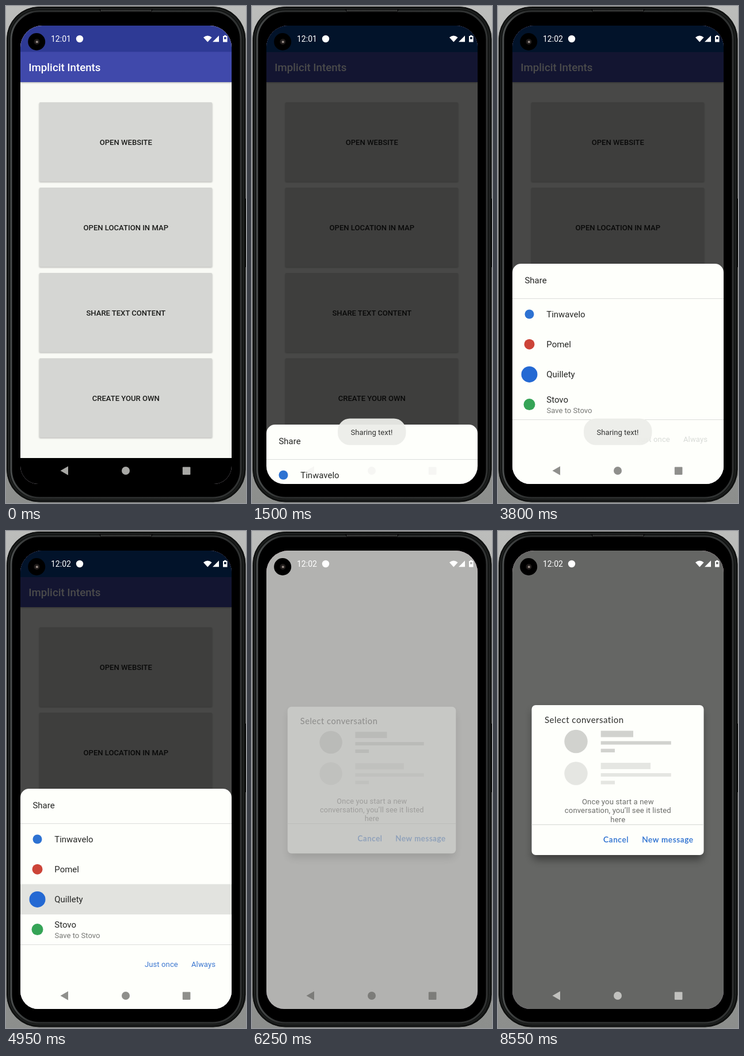
Animation of 417 by 862 pixels, one loop 8.65 s. Source, as an HTML page:

```html
<!DOCTYPE html>
<html lang="en">
<head>
<meta charset="utf-8">
<title>Share sheet demo</title>
<style>
html, body { margin: 0; width: 100%; height: 100%; overflow: hidden; background: #a5a6a4; }
svg { display: block; width: 100%; height: 100%; }
text { font-family: Roboto, "Noto Sans", sans-serif; font-size: 13.07px; }
.mid { text-anchor: middle; }
.med { font-weight: 500; }
.big { font-size: 14.94px; fill: #252624; }
.geo { font-family: Lato, "Open Sans", sans-serif; }
.act { font-size: 13.5px; letter-spacing: .7px; fill: #2a6fd0; stroke: #2a6fd0; stroke-width: .3px; }
.body { fill: #6b6c69; letter-spacing: .14px; }
</style>
</head>
<body>
<svg viewBox="0 0 417 862">
  <defs>
    <linearGradient id="room" x1="0" y1="0" x2="0" y2="1">
      <stop offset="0" stop-color="#bcbdbb"/><stop offset="1" stop-color="#8c8e8c"/>
    </linearGradient>
    <linearGradient id="rim" x1="0" y1="0" x2="1" y2="0">
      <stop offset="0" stop-color="#4a4d4d"/><stop offset=".1" stop-color="#2c2e2e"/>
      <stop offset="1" stop-color="#303232"/>
    </linearGradient>
    <linearGradient id="wall" gradientUnits="userSpaceOnUse" x1="0" y1="34" x2="0" y2="829">
      <stop offset="0" stop-color="#bd84a0"/><stop offset=".55" stop-color="#b5728f"/>
      <stop offset=".71" stop-color="#8f4069"/><stop offset=".818" stop-color="#70405f"/>
      <stop offset=".819" stop-color="#1c0032"/><stop offset="1" stop-color="#18002b"/>
    </linearGradient>
    <clipPath id="screen">
      <path d="M25 72A38 38 0 0 1 63 34H354A38 38 0 0 1 392 72V798A31 31 0 0 1 361 829H56A31 31 0 0 1 25 798Z"/>
    </clipPath>
    <clipPath id="window"><rect x="25" y="34" width="367" height="795"/></clipPath>
    <clipPath id="btnClip"><rect x="58" y="463" width="300" height="137.5" rx="2"/></clipPath>
    <clipPath id="rowClip"><rect x="25" y="612.5" width="367" height="52.5"/></clipPath>
    <filter id="soft" x="-20%" y="-20%" width="140%" height="140%"><feGaussianBlur stdDeviation="7"/></filter>
    <filter id="fine" x="-5%" y="-5%" width="110%" height="112%"><feGaussianBlur stdDeviation="1"/></filter>
  </defs>

  <!-- phone body -->
  <rect width="417" height="862" fill="url(#room)"/>
  <rect x="414" y="334" width="3" height="119" fill="#111"/>
  <rect x="1.5" y="1.5" width="414.5" height="858.5" rx="56" fill="#121413" stroke="#060606"/>
  <rect x="4.5" y="4.5" width="408" height="852" rx="53" fill="none" stroke="#2a2c2c"/>
  <rect x="9" y="9" width="399" height="844" rx="49" fill="#000" stroke="url(#rim)" stroke-width="3"/>
  <rect x="13" y="13" width="391" height="836" rx="45" fill="#000"/>
  <path d="M161 5H256L252 11H165Z" fill="#0b0b0b"/>
  <path d="M165 8H252" stroke="#5c5e5d" stroke-width="3" stroke-dasharray="1 1"/>

  <g clip-path="url(#screen)">
    <rect x="25" y="34" width="367" height="795" fill="url(#wall)"/>
    <g id="app" clip-path="url(#window)">
      <rect x="25" y="34" width="367" height="795" fill="#f9faf5"/>
      <rect x="25" y="80" width="367" height="53.5" fill="#000" opacity=".25" filter="url(#fine)"/>
      <rect x="25" y="34" width="367" height="46" fill="#2e3a95"/>
      <rect x="25" y="79.5" width="367" height="52.5" fill="#4049ab"/>
      <text class="med" x="39.3" y="113" style="font-size:18.68px" fill="#fff">Implicit Intents</text>
      <g id="buttons"></g>
      <rect x="25" y="784" width="367" height="45"/>
      <g id="dim">
        <rect x="25" y="34" width="367" height="795" opacity=".71"/>
        <rect x="25" y="34" width="367" height="46" fill="#02132a"/>
      </g>
      <g id="sheet">
        <rect x="25" y="447" width="367" height="500" rx="15" fill="#fefffb"/>
        <text class="big" x="46.5" y="480.5">Share</text>
        <path d="M25 507.5H392" stroke="#dcdedb"/>
        <g clip-path="url(#rowClip)"><circle id="rowRipple" cx="208" cy="639" fill="#e2e3df"/></g>
        <g id="rows"></g>
      </g>
      <g id="footer">
        <rect x="25" y="717" width="367" height="112" fill="#fefffb"/>
        <path d="M25 717.5H392" stroke="#dcdedb"/>
        <rect id="press" x="233" y="731.5" width="73" height="38.5" rx="3" fill="#eaebe8"/>
        <g id="choices" letter-spacing=".1"><text x="240.9" y="756">Just once</text><text x="322" y="756">Always</text></g>
      </g>
    </g>
    <rect id="page" x="25" y="34" width="367" height="795" fill="#fefffb"/>
    <rect id="shade" x="25" y="34" width="367" height="795"/>

    <g id="dialog">
      <rect x="60" y="310" width="296" height="260" rx="8" opacity=".4" filter="url(#soft)"/>
      <rect x="58.5" y="302" width="299" height="260" rx="7" fill="#fefffb"/>
      <text class="geo" x="81" y="333" style="font-size:15px;letter-spacing:.5px" fill="#2c2d2b">Select conversation</text>
      <g id="bones"></g>
      <text class="mid body" x="208.3" y="473.5">Once you start a new</text>
      <text class="mid body" x="208.3" y="489.2">conversation, you’ll see it listed</text>
      <text class="mid body" x="208.3" y="504.8">here</text>
      <path d="M58.5 509.3H357.5" stroke="#d3d6d2"/>
      <text class="geo act" x="183" y="540">Cancel</text>
      <text class="geo act" x="250.3" y="540">New message</text>
    </g>

    <g id="toast">
      <rect x="149" y="715.5" width="118.5" height="46" rx="21" fill="#ecede9" opacity=".94"/>
      <text class="mid" x="208" y="744" fill="#333432">Sharing text!</text>
    </g>

    <g fill="#fff">
      <text id="clock" x="78" y="62" style="font-size:14px">12:01</text>
      <circle cx="128" cy="57" r="6.2"/>
      <path d="M343 54.6Q350.3 48.4 357.6 54.6L350.3 62.6Z"/>
      <path d="M359 62.3L370 51.3V62.3Z"/>
      <path fill-rule="evenodd" d="M379 50.8H382.5V52H384.5V62.4H377V52H379ZM379 54H382.6V57.4H379Z"/>
    </g>
    <g id="nav"><path d="M94.5 806L108 798.3V813.7Z"/><circle cx="208" cy="806" r="7"/><rect x="306.8" y="799.5" width="13.6" height="13.6" rx="1"/></g>
    <circle cx="53.2" cy="62" r="15"/>
    <circle cx="53.5" cy="62" r="5" fill="#211d1c"/>
    <circle cx="53.8" cy="62.3" r="2" fill="#988d86"/>
  </g>
</svg>

<script>
const LOOP = 8650, STEP = 50, WIDTH = 367, CX = 208.5, CY = 431.5;
const $ = id => document.getElementById(id);
const set = (id, attrs) => { for (const k in attrs) $(id).setAttribute(k, attrs[k]); };
const fade = (id, v) => set(id, { opacity: v.toFixed(3) });
const ramp = (t, a, b) => Math.min(1, Math.max(0, (t - a) / (b - a)));
const mix = (a, b, p) => a + (b - a) * p;

// piecewise linear value from [time, value] pairs
function track(t, keys) {
  let [t0, v0] = keys[0];
  for (const [t1, v1] of keys) {
    if (t < t1) return mix(v0, v1, ramp(t, t0, t1));
    [t0, v0] = [t1, v1];
  }
  return v0;
}

function build() {
  const labels = ['OPEN WEBSITE', 'OPEN LOCATION IN MAP', 'SHARE TEXT CONTENT', 'CREATE YOUR OWN'];
  $('buttons').innerHTML = labels.map((label, i) => {
    const y = 167 + 148 * i;
    const ripple = i === 2 ? '<g clip-path="url(#btnClip)"><circle id="btnRipple" cx="208" cy="532"/></g>' : '';
    return `<rect x="57.5" y="${y + 1}" width="301" height="138" rx="2" opacity=".22" filter="url(#fine)"/>
      <rect x="58" y="${y}" width="300" height="137.5" rx="2" fill="#d5d6d3"/>${ripple}
      <text class="mid med" x="208.3" y="${y + 74.3}" fill="#1b1c1a">${label}</text>`;
  }).join('');

  const rows = [
    ['Tinwavelo', '#2d72d2', 8],
    ['Pomel', '#cc4438', 9],
    ['Quillety', '#2469d3', 14],
    ['Stovo', '#35a456', 10, 'Save to Stovo']
  ];
  $('rows').innerHTML = rows.map(([name, color, r, note], i) => {
    const y = 534.5 + 52.2 * i;
    return `<circle cx="54.5" cy="${y}" r="${r}" fill="${color}"/>
      <text class="big" x="84.3" y="${y + (note ? -3.2 : 5.3)}">${name}</text>` +
      (note ? `<text x="84.5" y="${y + 15.2}" fill="#777875">${note}</text>` : '');
  }).join('');

  const bone = (y, w, color) =>
    `<g fill="${color}"><circle cx="135.5" cy="${y}" r="20.2"/>
     <rect x="178.7" y="${y - 18.5}" width="${w}" height="11"/>
     <rect x="178.7" y="${y - .5}" width="122" height="6"/>
     <rect x="178.7" y="${y + 12.7}" width="24.3" height="6.2"/></g>`;
  $('bones').innerHTML = bone(365, 56.3, '#d1d2ce') + bone(420.5, 86.3, '#e5e6e2');
}

function place(id, dx, scale, dy = 0) {
  set(id, { transform: `translate(${CX + dx} ${CY + dy}) scale(${scale}) translate(${-CX} ${-CY})` });
}

function draw(t) {
  // button tap, scrim, toast
  set('btnRipple', { r: 165 * ramp(t, 800, 1100) });
  fade('btnRipple', .13 * (t < 850 ? 0 : 1 - ramp(t, 1100, 1300)));
  fade('toast', Math.min(ramp(t, 1050, 1300), 1 - ramp(t, 4450, 4950)));

  // share sheet
  const rise = 1 - (1 - ramp(t, 1500, 1650)) ** 2;
  const top = t < 1500 ? 900 : t < 2500 ? mix(726, 477, rise) : 447;
  set('sheet', { transform: `translate(0 ${top - 447})` });
  fade('footer', t < 1600 ? 0 : 1);
  set('rowRipple', { r: 190 * ramp(t, 4000, 4400) });
  const on = ramp(t, 4050, 4250);
  const rgb = [[216, 58], [219, 118], [215, 208]].map(([a, b]) => Math.round(mix(a, b, on)));
  set('choices', { fill: `rgb(${rgb})` });
  fade('press', ramp(t, 5500, 5650));

  // window switch
  const p = ramp(t, 5600, 6060);
  const slide = 1 - (1 - p) ** 3;
  const dip = Math.sin(Math.PI * p ** .62);
  const scale = 1 - .045 * dip;
  fade('dim', ramp(t, 1050, 1350) * (1 - p) ** 2.7);
  place('app', -WIDTH * slide, scale, -1.6 * dip);
  place('page', WIDTH * (1 - slide), scale);

  // conversation dialog
  fade('shade', .6 * ramp(t, 6100, 6400));
  const pop = ramp(t, 6150, 6500);
  fade('dialog', pop);
  place('dialog', 0, mix(.94, 1, 1 - (1 - pop) ** 3));

  $('clock').textContent = t < 3800 ? '12:01' : '12:02';
  const g = Math.round(track(t, [[1050, 168], [1350, 246], [1500, 246], [1650, 143],
    [5600, 143], [5750, 124], [6250, 124], [6550, 193]]));
  set('nav', { fill: `rgb(${g},${g},${g - 3})` });
}

build();
const start = performance.now();
function tick() {
  const t = (performance.now() - start) % LOOP;
  draw(Math.floor(t / STEP) * STEP);
  requestAnimationFrame(tick);
}
tick();
</script>
</body>
</html>
```
